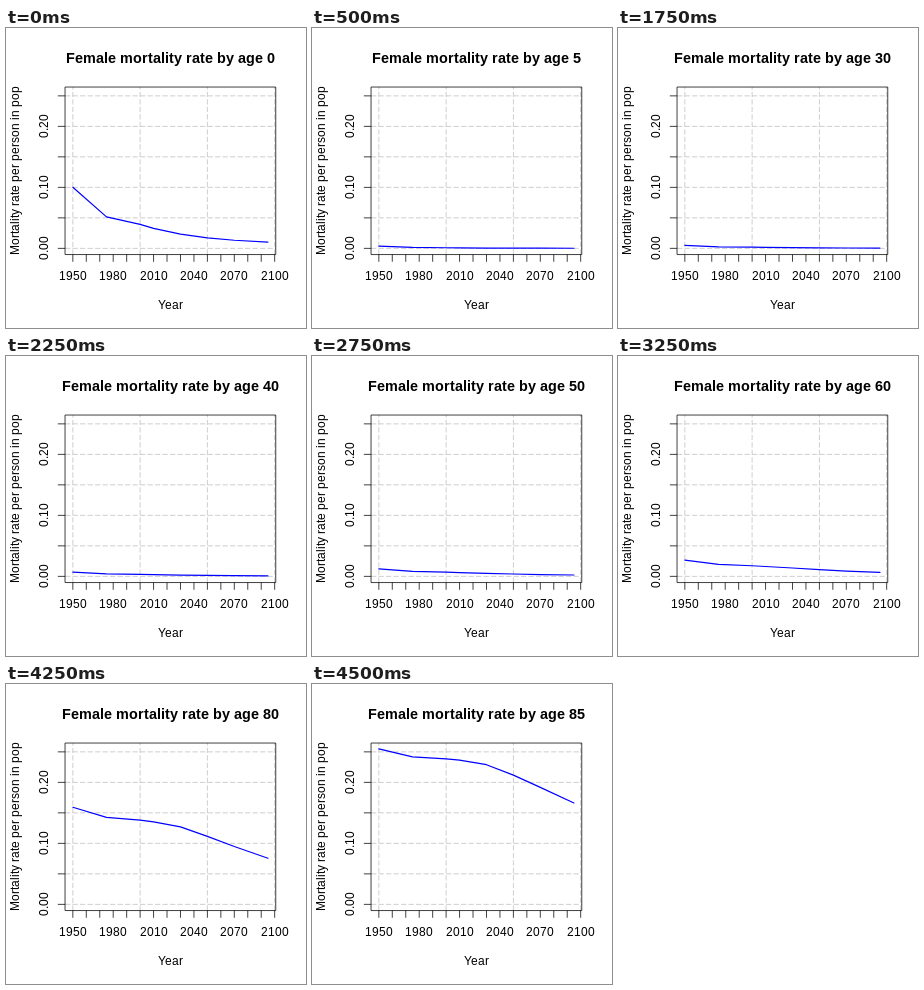
Write an HTML page that moves like this. It is 300 px wide and 300 px high and loops after 4.75 s.

```html
<!DOCTYPE html>
<html lang="en">
<head>
<meta charset="utf-8">
<title>Female mortality rate by age</title>
<style>
  html, body { margin: 0; width: 100%; height: 100%; overflow: hidden; background: #fff; }
  svg { display: block; width: 300px; height: 300px; }
  text { font: 12px "Liberation Sans", Arial, sans-serif; fill: #000; white-space: pre; }
  .title { font-size: 14.4px; font-weight: bold; }
  path { fill: none; stroke-width: .75; }
  .axis { stroke: #000; }
  .grid { stroke: #bebebe; stroke-dasharray: 5.25 2.25; }
  .curve { stroke: #00f; stroke-width: 1.2; stroke-linejoin: round; stroke-linecap: round; }
</style>
</head>
<body>
<svg id="plot" viewBox="0 0 300 300"></svg>
<script>
const STEP = 250;
const STEPS = 19;
const FONT = '"Liberation Sans", Arial, sans-serif';
const left = 59.04, right = 269.76, top_ = 59.04, bottom = 226.56;
const midX = (left + right) / 2;
const midY = (top_ + bottom) / 2;

// Year, then the share of the total improvement reached by infants and by the oldest
const progress = [
  [1950, 0, 0], [1975, 0.29, 0.125], [2000, 0.41, 0.158], [2010, 0.489, 0.177],
  [2030, 0.64, 0.252], [2050, 0.773, 0.433], [2070, 0.887, 0.666], [2095, 1, 1]
];

const xOf = year => 66.84 + (year - 1950) * 195.11 / 145;
const yOf = rate => 220.36 - rate * 610;
const ageAt = step => step < 2 ? step : 5 * (step - 1);

// Infant deaths plus a Gompertz curve, both shrinking over time;
// the open-ended last age group improves least
function rateAt(age, young, old) {
  const p = young + (old - young) * (age / 85) ** 2.3;
  const gain = 3.36 - 0.0325 * age - 0.17 * Math.exp((age - 85) / 2);
  const infant = 0.0963 * Math.exp(-2.2 * age - 2.25 * p);
  const adult = 0.0037 + 0.2513 * Math.exp(0.096 * (age - 85));
  return infant + adult * Math.exp(-gain * p);
}

const svg = document.getElementById('plot');
const ctx = document.createElement('canvas').getContext('2d');

function add(tag, attrs) {
  const el = document.createElementNS('http://www.w3.org/2000/svg', tag);
  for (const key in attrs) el.setAttribute(key, attrs[key]);
  return svg.appendChild(el);
}

const line = (cls, d) => add('path', { class: cls, d });

// Centred text with kerned, whole-pixel glyph advances
function setText(el, str, center, y, font) {
  ctx.font = `${font} ${FONT}`;
  const width = s => ctx.measureText(s).width;
  const advances = [...str].map((c, i) => {
    const next = str[i + 1] || '';
    return Math.round(width(c + next) - width(next));
  });
  let x = Math.round(center - advances.reduce((a, b) => a + b, 0) / 2);
  el.setAttribute('x', advances.map(w => (x += w) - w).join(' '));
  el.setAttribute('y', y);
  el.textContent = str;
}

const label = (str, x, y) => setText(add('text', {}), str, x, y, '12px');
const sideLabel = (str, x, y) =>
  setText(add('text', { transform: 'rotate(-90)' }), str, -y, x, '12px');

for (let year = 1950; year <= 2100; year += 50)
  line('grid', `M${xOf(year)} ${bottom}V${top_}`);
for (let i = 0; i <= 5; i++)
  line('grid', `M${left} ${yOf(i / 20)}H${right}`);

const curve = line('curve', '');

line('axis', `M${left} ${top_}H${right}V${bottom}H${left}Z`);
for (let year = 1950; year <= 2100; year += 10) {
  line('axis', `M${xOf(year)} ${bottom}v7.2`);
  if (year % 30 === 0) label(String(year), xOf(year), 252);
}
for (let i = 0; i <= 5; i++) {
  line('axis', `M${left} ${yOf(i / 20)}h-7.2`);
  if (i % 2 === 0) sideLabel((i / 20).toFixed(2), 42, yOf(i / 20));
}
label('Year', midX, 281);
sideLabel('Mortality rate per person in pop', 13, midY);
const title = add('text', { class: 'title' });

let shown = -1;
function draw() {
  const step = Math.floor(performance.now() / STEP) % STEPS;
  if (step !== shown) {
    shown = step;
    const age = ageAt(step);
    setText(title, `Female mortality rate by age ${age}`, midX, 35, 'bold 14.4px');
    const points = progress.map(([year, young, old]) =>
      `${xOf(year)} ${yOf(rateAt(age, young, old))}`);
    curve.setAttribute('d', 'M' + points.join('L'));
  }
  requestAnimationFrame(draw);
}
draw();
</script>
</body>
</html>
```
